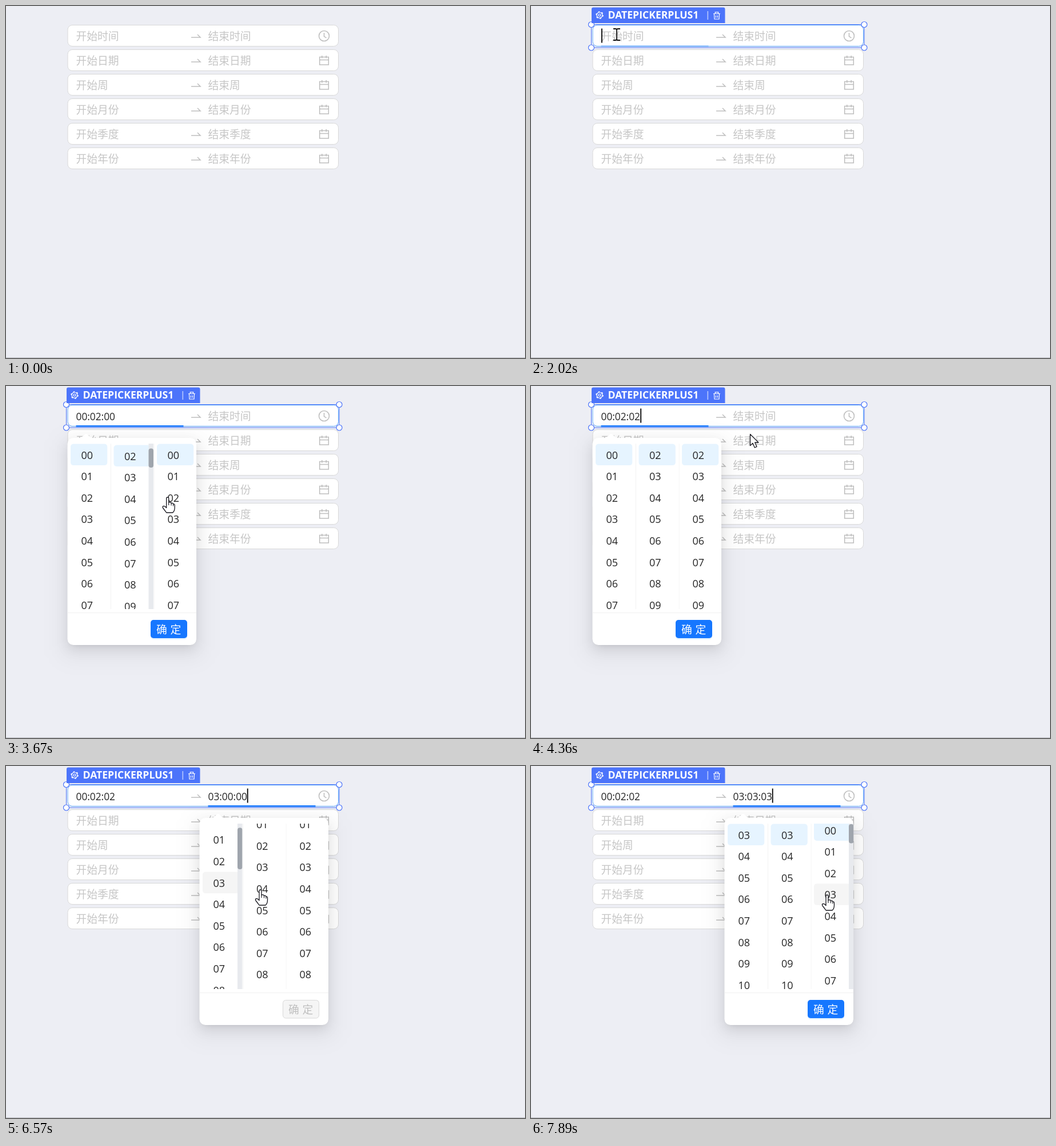
Animation, 908 px wide and 617 px high, one loop 8000 ms. Source, as an HTML page:

```html
<!DOCTYPE html>
<html lang="zh-CN">
<head>
<meta charset="utf-8">
<title>时间范围选择</title>
<style>
html, body { margin: 0; width: 100%; height: 100%; overflow: hidden; background: #edeef4; }
svg { display: block; }
text { font-family: "Open Sans", "Noto Sans CJK SC", "Noto Sans CJK", sans-serif; }
.cjk { font-family: "Noto Sans CJK SC", "Noto Sans CJK", sans-serif; font-weight: 300; }
</style>
</head>
<body>
<svg id="stage" width="908" height="617" viewBox="0 0 908 617"></svg>
<script>
const LOOP = 8000, SELECT = 1380, FOCUS = 1975, SWITCH = 5400;
const LEFT = 107.5, TOP = 91, COL = 75.5, ROW = 37.6, VIEW = 290;
const BLUE = '#1677ff', MARK = '#4c74fa', GREY = '#bfbfbf', HINT = '#c6c6c6', INK = '#262626';

// Moments of clicking a cell and the time chosen so far
const CHOICES = [[3400, '00:02:00'], [3900, '00:02:02'],
  [6472, '03:00:00'], [6775, '03:03:00'], [7842, '03:03:03']];

// Stops of the pointer: [time, x, y]
const STOPS = [[230, 892, 537], [800, 330, 5], [1300, 150, 50], [2050, 150, 50],
  [2720, 249, 189], [2850, 249, 189], [3400, 220, 195], [3750, 292, 195], [3950, 292, 195],
  [4360, 383, 84], [5100, 408, 52], [5400, 402, 52], [5660, 399, 83], [6400, 374, 226],
  [6490, 374, 226], [6570, 445, 217], [7150, 448, 230], [7450, 518, 226]];

const ramp = (t, from, length) => {
  const u = Math.min(1, Math.max(0, (t - from) / length));
  return u * u * (3 - 2 * u);
};
const mix = (a, b, u) => a + (b - a) * u;
const shift = t => 231 * ramp(t, SWITCH, 300);

const rect = (x, y, w, h, fill, r = 0, more = '') =>
  `<rect x="${x}" y="${y}" width="${w}" height="${h}" rx="${r}" fill="${fill}" ${more}/>`;
const line = (d, stroke, width = 1.6) =>
  `<path d="${d}" fill="none" stroke="${stroke}" stroke-width="${width}"/>`;
const ring = (x, y, r, stroke, width, more = '') =>
  `<circle cx="${x}" cy="${y}" r="${r}" stroke="${stroke}" stroke-width="${width}" ${more || 'fill="none"'}/>`;
const text = (x, y, s, size, fill, more = '') =>
  `<text x="${x}" y="${y}" font-size="${size}" fill="${fill}" ${more}>${s}</text>`;
const group = (x, y, body, more = '') => `<g transform="translate(${x} ${y})" ${more}>${body}</g>`;

// Choice made by time t in the first or second input, or ''
function chosen(second, t) {
  const made = CHOICES.filter(([at]) => at <= t && at > SWITCH === second).pop();
  return made ? made[1] : '';
}

const cellOf = (value, col) => value ? +value.split(':')[col] : 0;

function scrollTop(col, t) {
  const k = CHOICES.filter(([at]) => at <= t).length - 1;
  if (k < 0) return 0;
  const [at, value] = CHOICES[k], before = k ? CHOICES[k - 1][1] : '';
  return ROW * mix(cellOf(before, col), cellOf(value, col), ramp(t, at, 300));
}

function position(t) {
  const k = STOPS.filter(([at]) => at <= t).length;
  const a = STOPS[Math.max(0, k - 1)], b = STOPS[k] || a;
  const u = ramp(t, a[0], b[0] - a[0] || 1);
  return [mix(a[1], b[1], u), mix(a[2], b[2], u)];
}

// Column and row under the pointer; row -1 is the scrollbar
function hovered(t) {
  const [px, py] = position(t);
  const x = px - LEFT - shift(t), y = py - TOP - 10, col = Math.floor(x / COL);
  if (t < FOCUS + 300 || x < 0 || col > 2 || y < 0 || y > VIEW) return [-1, -1];
  return [col, x - col * COL < 65.5 ? Math.floor((y + scrollTop(col, t)) / ROW) : -1];
}

const clock = ring(0, 0, 9, GREY, 1.6) + line('M0 -5.5V.8L4 3.4', GREY);
const calendar = line('M-7.8 -6H7.8V7.5H-7.8ZM-7.8 -1H7.8M-3.7 -8.5V-4M3.7 -8.5V-4', GREY);

function field(unit, i, t) {
  const y = 33.5 + 43 * i, focused = !i && t >= FOCUS;
  const value = (x, s, hint) => s
    ? text(x, y + 26.2, s, 17.3, INK)
    : text(x, y + 26.5, hint + unit, 18.8, HINT, 'class="cjk"');
  return rect(108, y, 473.5, 37, '#fff', 8, `stroke="${focused ? '#5ba6fb' : '#d9d9d9'}"`) +
    value(122.5, i ? '' : chosen(false, t + 100), '开始') +
    value(353.5, i ? '' : chosen(true, t + 100), '结束') +
    line(`M324 ${y + 21.5}H340L335 ${y + 16.5}`, GREY, 1.5) +
    group(556.5, y + 19, i ? calendar : clock);
}

function selection() {
  const gear = ring(0, 0, 5, '#fff', 1.2) + ring(0, 0, 2, '#fff', 1.2) +
    ring(0, 0, 6, '#fff', 1.6, 'fill="none" stroke-dasharray="2.6 3.68"');
  const trash = line('M-6 -3.5H6M-2.7 -4V-6.2H2.7V-4M-4.6 -3.5L-4 6H4L4.6 -3.5M-1.5 -.5V3.5M1.5 -.5V3.5', '#fff', 1.2);
  const corners = [105.5, 583].flatMap(x => [32.5, 73].map(y => ring(x, y, 5, MARK, 1.2, 'fill="#fff"')));
  return rect(105.5, 32.5, 477.5, 40.5, 'none', 0, `stroke="${MARK}"`) + corners.join('') +
    `<path d="M106 30V5.5Q106 2.5 109 2.5H336.5Q339.5 2.5 339.5 5.5V30Z" fill="${MARK}"/>` +
    group(120, 16, gear) + group(325, 17, trash) + rect(308.5, 9, 1.6, 15, '#b7c7fd') +
    text(134.5, 22.3, 'DATEPICKERPLUS1', 17.6, '#fff', 'font-weight="700"');
}

function column(col, t) {
  const top = scrollTop(col, t), first = Math.floor(top / ROW);
  const [hoverCol, hoverRow] = hovered(t - 110);
  const picked = chosen(t >= SWITCH, t - 120);
  let out = '';
  for (let i = first; i < first + 9; i++) {
    const mid = 20 + i * ROW - top;
    const shade = picked && i === cellOf(picked, col) ? '#e6f4ff'
      : col === hoverCol && i === hoverRow ? '#f5f5f5' : '';
    if (shade) out += rect(5.5, mid - 19.5, 64.3, ROW, shade, 5);
    out += text(34.3, mid + 6.6, String(i).padStart(2, '0'), 18, INK, 'text-anchor="middle"');
  }
  if (col) out += rect(0, 0, 1, VIEW, '#f2f2f2');
  if (col === hoverCol) {
    const ratio = VIEW / ((col ? 60 : 24) * ROW + 252);
    out += rect(66.5, 0, 8.5, VIEW, '#e8eaee') +
      rect(66.5, top * ratio, 8.5, VIEW * ratio, '#9fa5ad', 4);
  }
  return `<svg x="${col * COL}" y="10" width="75" height="${VIEW}">${out}</svg>`;
}

function popup(t) {
  const open = ramp(t, FOCUS + 85, 260);
  const ready = ramp(t, 3460, 200) - (t >= SWITCH) + ramp(t, 6600, 200);
  const shadow = (x, y, w, h, alpha, blur) =>
    rect(x, y, w, h, `rgba(0,0,0,${alpha})`, 11, `style="filter:blur(${blur}px)"`);
  const label = fill => text('155.5 180', 342.5, '确定', 18.8, fill, 'class="cjk"');
  const button = rect(146, 319.5, 63, 31.5, '#f5f5f5', 5, 'stroke="#d9d9d9"') + label(GREY) +
    `<g opacity="${ready}">` + rect(145.5, 321.5, 64, 32, '#e6f4ff', 5) +
    rect(145.5, 319, 64, 32, BLUE, 5) + label('#fff') + '</g>';
  const body = shadow(-11, 1, 247.5, 385, .05, 18) + shadow(0, 8, 225.5, 363, .08, 10) +
    shadow(5, 9, 215.5, 353, .12, 4) + rect(0, 0, 225.5, 363, '#fff', 10.5) +
    '<path d="M18 .5Q24 0 28 -4L31 -6.7Q32.5 -8 34 -6.7L37 -4Q41 0 47 .5Z" fill="#fff"/>' +
    [0, 1, 2].map(col => column(col, t)).join('') +
    rect(0, 306, 225.5, 1, '#f0f0f0') + button;
  return group(LEFT + shift(t), TOP, `<g transform="scale(1 ${mix(.8, 1, open)})">${body}</g>`, `opacity="${open}"`);
}

function caret(t) {
  if ((t + 345) % 1060 > 830) return '';
  const second = t >= SWITCH;
  return rect((second ? 353.5 : 123) + (chosen(second, t + 100) ? 68.3 : 0), 39.5, 1.8, 25, '#000');
}

function pointer(t) {
  if (t < STOPS[0][0]) return '';
  const [x, y] = position(t);
  const solid = d => `<path d="${d}" fill="#fff" stroke="#16161d" stroke-width="1.3" stroke-linejoin="round"/>`;
  let shape;
  if (hovered(t)[1] >= 0) {
    shape = solid('M-2 2Q-2 0 0 0T2 2V9Q6 8 6.5 10.5Q9.5 9.5 10 12Q12.5 11.5 12.5 14V18' +
      'Q12.5 24 9 27H-2Q-4 24 -8 19Q-9.5 16 -7 15.5Q-5 15 -2 18.5Z') +
      line('M2 9V14M6.5 10.5V14.5M10 12V15.5', '#16161d', 1.1);
  } else if (y > 33 && y < 71 && x > 108 && x < 540) {
    shape = line('M-6 -10H-2Q0 -10 0 -8Q0 -10 2 -10H6M0 -8V8M-6 10H-2Q0 10 0 8Q0 10 2 10H6', '#111', 1.8);
  } else {
    shape = solid('M.5 .5V20.5L5 16.3L8.3 24L12 22.4L8.7 15H15Z');
  }
  return group(x, y, shape);
}

function scene(t) {
  const fields = ['时间', '日期', '周', '月份', '季度', '年份'].map((unit, i) => field(unit, i, t));
  return rect(0, 0, 908, 617, '#edeef4') + rect(0, 616, 908, 1, '#bcbdc3') + fields.join('') +
    (t >= SELECT ? selection() : '') +
    (t >= FOCUS ? rect(122.5 + shift(t - 10), 69, 188, 2.7, BLUE, 0, `opacity="${ramp(t, FOCUS, 130)}"`) +
      caret(t) + popup(t) : '') +
    pointer(t);
}

const stage = document.getElementById('stage');
const begin = performance.now();
function frame() {
  stage.innerHTML = scene((performance.now() - begin) % LOOP);
  requestAnimationFrame(frame);
}
frame();
</script>
</body>
</html>
```
